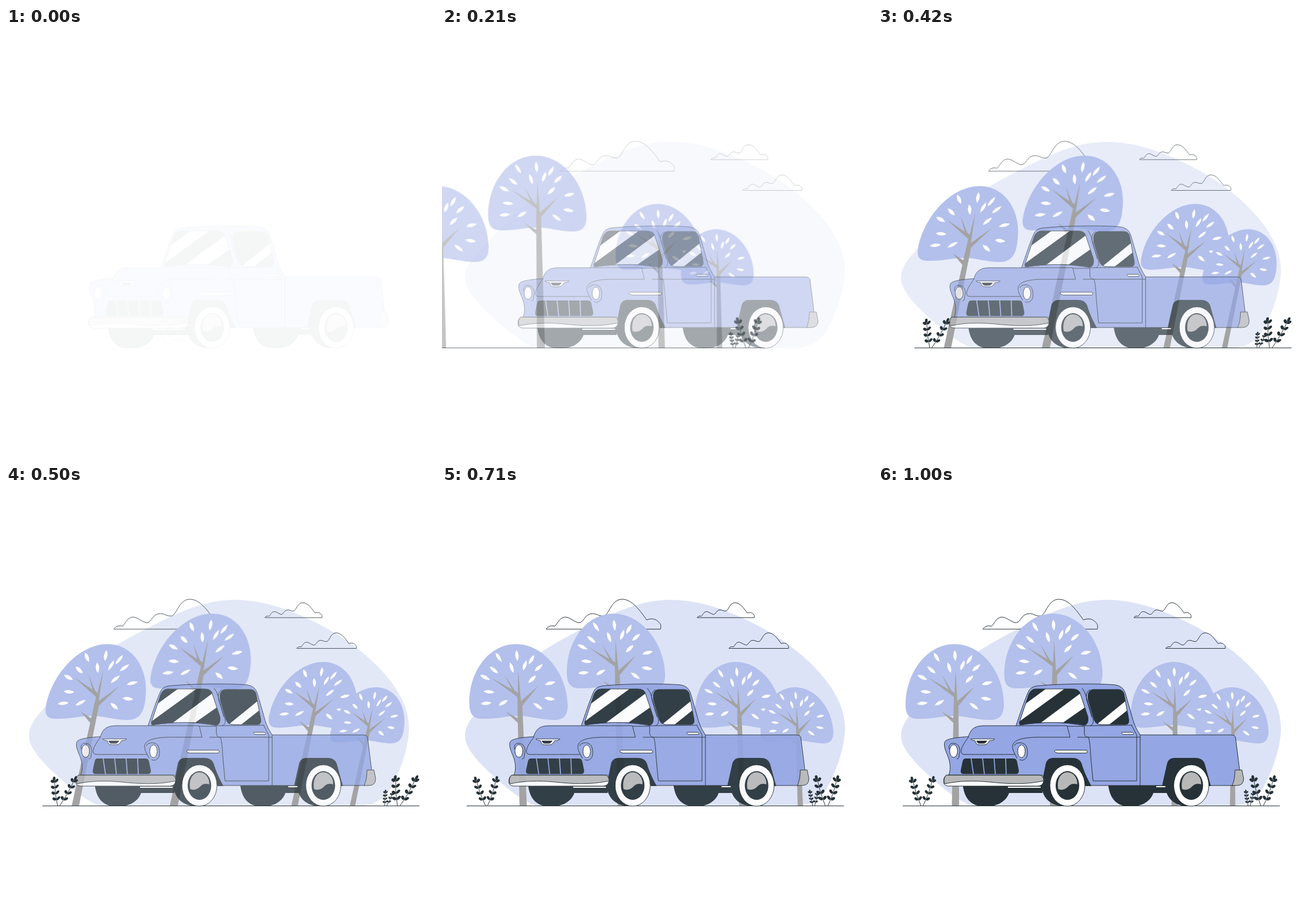
Animation of 748 by 748 pixels, one loop 1.04 s. Source, as an HTML page:

```html
<!DOCTYPE html>
<html lang="en">
<head>
<meta charset="utf-8">
<title>Pickup truck</title>
<style>
  html, body { margin: 0; width: 100%; height: 100%; overflow: hidden; background: #fff; }
  svg { display: block; width: 100%; height: 100%; }
  .line { fill: none; stroke: #263238; stroke-width: 1; vector-effect: non-scaling-stroke; stroke-linejoin: round; }
  .dark { fill: #263238; }
  .body { fill: #94a6e3; stroke: #263238; }
  .white { fill: #fff; }
  .trim { fill: #fff; stroke: #263238; }
  .gray { fill: #b8b8b8; }
</style>
</head>
<body>
<svg viewBox="0 0 748 748">
  <defs>
    <path id="cloud" class="line" d="M0 0C3-5 9-7 15-5C20-10 24-21 33-21C41-21 46-14 57-11C67-12 66-27 81-27C89-27 91-22 101-23C110-27 114-52 132-52C150-52 163-32 175-16C184-20 192-17 196-12C200-9 200-5 199 0Z"/>
    <g id="tree">
      <path fill="#b3c0ec" d="M0 0C48 0 86 50 86 104C86 125 78 133 58 132C35 131 20 125 0 125C-20 125-38 130-58 130C-76 131-85 126-85 106C-85 50-48 0 0 0Z"/>
      <g id="leaves" fill="#fff"></g>
      <path fill="#a3a3a3" d="M2 46L5 99L36 73L7 107L8.500 335H-5.500L-2 137L-23 117L-2 129L-1 92L-46 58L-10 79L-22 53L-5 81L0 85Z"/>
    </g>
    <g id="wheel">
      <ellipse class="trim" rx="30.5" ry="36"/>
      <ellipse class="dark" rx="20.5" ry="25"/>
      <path class="gray" d="M-16 6C-19-10-12-23 0-23C11-23 18-12 17-2C8-5 4-1 0 3C-4 7-11 9-16 6Z"/>
    </g>
    <clipPath id="ground"><path d="M0 0H748V557H0Z"/></clipPath>
    <clipPath id="shield"><path id="shieldShape" d="M246 411L262 363Q266 353 275 353H338Q348 353 351 359L365 401Q367 413 360 416C330 410 285 410 251 415Q245 416 246 411Z"/></clipPath>
    <clipPath id="pane"><path id="paneShape" d="M374 354H418Q426 354 428 362L436 405Q438 415 430 415H388Q379 415 376 407L366 373Q363 355 374 354Z"/></clipPath>
  </defs>

  <path id="blob" fill="#dde3f6" d="M40 432C42 405 70 385 100 350C130 316 170 288 218 262C280 230 335 198 398 198C450 198 500 218 540 238C620 278 701 350 701 420C701 455 685 500 668 528C655 548 635 557 612 557H165C140 548 115 528 90 505C65 482 38 455 40 432Z"/>

  <g id="clouds">
    <use href="#cloud" x="182.500" y="249"/>
    <use href="#cloud" transform="translate(445 229) scale(.5)"/>
    <use href="#cloud" transform="translate(500.5 282.5) scale(.52)"/>
  </g>

  <g clip-path="url(#ground)">
    <g id="trees">
      <use href="#tree" x="133" y="275"/>
      <use href="#tree" x="304.5" y="222"/>
      <use href="#tree" transform="translate(514.5 306) scale(.88)"/>
      <use href="#tree" transform="translate(615.5 350) scale(.74)"/>
    </g>
  </g>

  <path id="floor" class="line" d="M43 556.5H699"/>

  <g id="truck">
    <!-- far tyres, axles and near treads -->
    <path class="dark" d="M147 515C149 545 163 557 183 557H191C211 557 224 546 228 534H286V515ZM400 515C402 545 416 557 436 557H443C462 557 475 546 479 534H505V515ZM284 515C284 545 302 557 326 557H332V515ZM499 515C499 545 517 557 541 557H547V515Z"/>
    <path stroke="#fff" stroke-width="2" d="M226 524H283M484 523H500"/>

    <path class="body" d="M123 503C128 490 125 477 119 464C115 454 114 446 118 443C124 439 140 437 157 436C161 426 164 417 185 417H240C246 400 255 372 262 357Q265 350 275 348C310 344 380 343 413 346Q426 348 430 360L441 398Q445 417 456 433H614Q621 433 622 438L629 494L618 521H300L286 503Z"/>
    <path class="dark" d="M284 522L292 482Q295 473 305 473H338Q350 473 354 482Q359 500 371 521.500V522ZM494 522L503 482Q506 473 516 473H552Q564 473 568 482L579 521.500V522Z"/>
    <use href="#wheel" x="329.5" y="521"/>
    <use href="#wheel" x="545" y="521"/>

    <!-- panel seams -->
    <path class="line" d="M158 436C149 448 143 458 145 464Q146 467 150 467H238M334 437H275C240 438 229 446 236 462Q239 468 242 474M240 417H329L334 437M329 418H359M246 416C285 409 325 410 360 417H374L442 416M355 352Q360 357 362 366L374 405Q376 415 369 417M369 354Q360 359 363 372L372 402M359 418V431Q360 437 366 437Q369 445 370 470L374 513H450V433L441 416M347 437H456M456 433V521"/>

    <!-- glass -->
    <use href="#shieldShape" class="dark"/>
    <g clip-path="url(#shield)" class="white">
      <path d="M292 353H324L244 411V388Z"/>
      <path d="M279 415L357 357L370 378L317 415Z"/>
    </g>
    <use href="#shieldShape" class="line"/>
    <use href="#paneShape" class="dark"/>
    <path clip-path="url(#pane)" class="white" d="M379 416L432 373L440 385L401 416Z"/>
    <use href="#paneShape" class="line"/>

    <!-- lamps, grille and trim -->
    <path class="body" d="M124 458C122 449 128 446 134 448C142 450 144 460 141 467Q142 474 137 475"/>
    <path class="body" d="M237 452C240 445 252 445 257 451C261 458 261 470 257 474Q252 479 246 476"/>
    <ellipse class="trim" cx="131.500" cy="461" rx="6.800" ry="11"/>
    <ellipse class="trim" cx="249.500" cy="461.500" rx="6.500" ry="11"/>
    <path class="dark" d="M152 474H236Q241 474 242 480L245 495Q245 501 240 501H148Q143 501 144 494L147 480Q148 474 152 474Z"/>
    <path stroke="#94a6e3" stroke-width="1.700" d="M162 474L166 501M182 474L185 501M202 474L204 501M222 474L223 501"/>
    <path class="trim" d="M161 440H203Q201 443 194 443Q190 450 186 450H175Q171 450 169 443Q163 443 161 440Z"/>
    <path class="dark" d="M171 443H190Q187 448 184 448H176Q173 448 171 443Z"/>
    <path class="trim" d="M309 459.500H363Q365 462 363 464.500H312Q304 462 309 459.500Z"/>
    <path class="trim" d="M424 428.500H443Q446 430 444 432H426Q422 430 424 428.500Z"/>

    <!-- bumpers -->
    <path class="trim" d="M119 503H283Q289 507 288 514Q286 522 278 522H122Q113 521 114 512Q115 505 119 503Z"/>
    <path class="gray" stroke="#263238" d="M119 503H283Q289 507 288 513C255 520 225 518 195 515C165 512 140 513 116 518Q113 508 119 503Z"/>
    <path class="gray" stroke="#263238" d="M621 494H633L636 509Q636 521 624 521H616Q621 510 621 494Z"/>
  </g>

  <g id="plants" class="dark" clip-path="url(#ground)"></g>
</svg>

<script>
const $ = id => document.getElementById(id);
const lerp = (a, b, p) => a + (b - a) * p;

// leaf centre x, y and tilt inside a crown
$('leaves').innerHTML = [
  [1, 20, 85], [-31, 23, 57], [26, 27, -60], [-9, 41, 72], [14, 37, -70],
  [-40, 45, 38], [38, 41, -42], [-56, 58, 25], [26, 61, -45], [57, 68, -15],
  [-50, 83, 4], [-56, 103, -8], [-26, 102, -32], [34, 108, 35], [55, 95, 8]
].map(([x, y, a]) =>
  `<path transform="translate(${x} ${y}) rotate(${a})" d="M-9.500 0Q-2-6 9.500 0Q1 6-9.500 0Z"/>`).join('');

// a curved stem with pairs of leaves
function sprig(x, tipX, tipY, pairs, size) {
  const base = 557, cx = lerp(x, tipX, .7), cy = lerp(base, tipY, .5);
  const at = (a, b, c, p) => lerp(lerp(a, b, p), lerp(b, c, p), p);
  const leaf = (px, py, a) =>
    `<ellipse transform="translate(${px} ${py}) rotate(${a})" cx="${size * 1.25}" rx="${size}" ry="${size * .62}"/>`;
  const lean = -90 + (tipX - x) * .8;
  let out = `<path class="line" d="M${x} ${base}Q${cx} ${cy} ${tipX} ${tipY}"/>` + leaf(tipX, tipY + size, lean);
  for (let i = 1; i <= pairs; i++) {
    const p = i / (pairs + .6);
    const px = at(x, cx, tipX, p), py = at(base, cy, tipY, p);
    out += leaf(px, py, lean - 48) + leaf(px, py, lean + 48);
  }
  return out;
}
$('plants').innerHTML =
  sprig(75, 60, 510, 4, 3.7) + sprig(78, 95, 509, 4, 3.7) +
  sprig(666, 653, 508, 4, 4) + sprig(670, 688, 508, 4, 4) +
  sprig(644, 640, 531, 4, 2.2) + sprig(647, 653, 534, 3, 2.2);

function bezier(x1, y1, x2, y2) {
  const f = (a, b, s) => 3 * (1 - s) ** 2 * s * a + 3 * (1 - s) * s * s * b + s ** 3;
  return x => {
    let lo = 0, hi = 1;
    for (let i = 0; i < 24; i++) {
      const mid = (lo + hi) / 2;
      if (f(x1, x2, mid) < x) lo = mid; else hi = mid;
    }
    return f(y1, y2, hi);
  };
}
const easeOut = t => 1 - (1 - t) ** 2;
const pop = bezier(.36, -.01, .5, 1.38);
const dash = bezier(.25, -.01, .48, 1.38);

function lean(t) {
  if (t < .58) return lerp(.364, -.176, dash(t / .58));
  if (t < .8) return lerp(-.176, .035, dash((t - .58) / .22));
  return lerp(.035, 0, dash((t - .8) / .2));
}

function place(id, x, opacity, skew = 0, pivot = 0) {
  $(id).setAttribute('transform', `matrix(1 0 ${skew} 1 ${x - skew * pivot} 0)`);
  $(id).setAttribute('opacity', Math.max(0, Math.min(1, opacity)));
}

const LOOP = 1040, FPS = 24;
function draw(now) {
  const step = Math.floor((now % LOOP + 4) * FPS / 1000);
  const t = Math.min(1, (step + .5) / FPS);
  const drive = easeOut(t), drift = pop(Math.min(1, t + .02));
  const rush = t < .58 ? dash(t / .58) : 1;
  const shift = -374 * (1 - rush), skew = lean(t);

  place('blob', 0, drift);
  place('clouds', 28.5 * (1 - drift), drift);
  place('trees', shift, rush, skew, 389);
  place('plants', shift, rush, skew, 531);
  place('floor', shift, rush);
  place('truck', 30.5 * (1 - drive), drive);
}

const start = performance.now();
function tick() {
  draw(performance.now() - start);
  requestAnimationFrame(tick);
}
tick();
</script>
</body>
</html>
```
